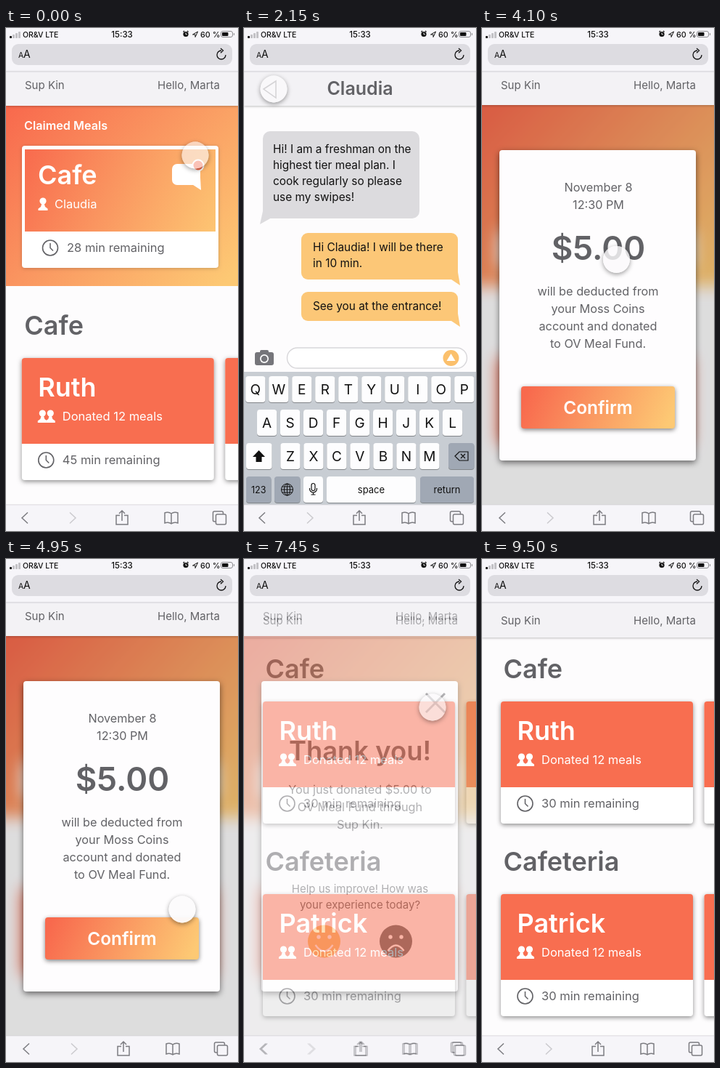
Animation of 320 by 692 pixels, one loop 9.55 s. Source, as an HTML page with a canvas:

```html
<!DOCTYPE html>
<html lang="en">
<head>
<meta charset="utf-8">
<title>Meal sharing prototype</title>
<style>
html, body { margin: 0; width: 100%; height: 100%; overflow: hidden; background: #fff; }
canvas { display: block; width: 320px; height: 692px; }
</style>
</head>
<body>
<canvas id="stage"></canvas>
<script>
const W = 320, H = 692, LOOP = 9550, STEP = 50;
const ratio = window.devicePixelRatio || 1;
const GREY = '#626266', SALMON = '#f86e50', AMBER = '#fcc777', PAPER = '#fdfcfd';
const APP = 'Sup Kin';

function prepare(canvas) {
  canvas.width = W * ratio;
  canvas.height = H * ratio;
  const context = canvas.getContext('2d');
  context.scale(ratio, ratio);
  return context;
}
const stage = prepare(document.getElementById('stage'));
let c = stage;

function screen(draw) {
  const canvas = document.createElement('canvas');
  c = prepare(canvas);
  draw();
  return canvas;
}

function rect(x, y, w, h, fill) {
  c.fillStyle = fill;
  c.fillRect(x, y, w, h);
}
function round(x, y, w, h, r, fill) {
  c.beginPath();
  c.roundRect(x, y, w, h, r);
  c.fillStyle = fill;
  c.fill();
}
function circle(x, y, r, fill) {
  c.beginPath();
  c.arc(x, y, r, 0, Math.PI * 2);
  c.fillStyle = fill;
  c.fill();
}
function shape(points, fill) {
  c.beginPath();
  points.forEach(([x, y]) => c.lineTo(x, y));
  c.closePath();
  c.fillStyle = fill;
  c.fill();
}
function stroke(path, color, width, x = 0, y = 0) {
  c.save();
  c.translate(x, y);
  c.strokeStyle = color;
  c.lineWidth = width;
  c.stroke(new Path2D(path));
  c.restore();
}
function text(s, x, y, size, color = GREY, weight = 400, align = 'left') {
  c.font = `${weight} ${size}px Inter, sans-serif`;
  c.fillStyle = color;
  c.textAlign = align;
  c.fillText(s, x, y);
}
function lines(list, x, y, pitch, size, color, align) {
  list.forEach((s, i) => text(s, x, y + i * pitch, size, color, 400, align));
}
function shadowed(draw, blur = 6, dy = 2, alpha = 0.45) {
  c.save();
  c.shadowColor = `rgba(0,0,0,${alpha})`;
  c.shadowBlur = blur * ratio;
  c.shadowOffsetY = dy * ratio;
  draw();
  c.restore();
}
function sunset(x0, y0, x1, y1) {
  const g = c.createLinearGradient(x0, y0, x1, y1);
  g.addColorStop(0, '#f8694d');
  g.addColorStop(0.45, '#fa9560');
  g.addColorStop(1, '#fdc974');
  return g;
}

function statusBar() {
  rect(0, 0, W, 60, '#f6f5f9');
  for (let i = 0; i < 4; i++) round(5 + i * 4, 11 - i * 2, 3, 3 + i * 2, 0.8, i ? '#c3c2c6' : '#111');
  text('OR&V LTE', 23, 12.5, 10.5, '#111', 500);
  text('15:33', 160, 12.5, 11.5, '#111', 500, 'center');
  circle(248, 8.5, 3.6, '#111');
  stroke('M244.500 5.500l1.500-1.500M251.500 5.500l-1.500-1.500', '#111', 1.3);
  stroke('M248 6.500v2.300h1.800', '#fff', 0.9);
  stroke('M257.500 9l7-4-3.500 7.500v-3.500z', '#111', 1);
  text('60 %', 268, 12.5, 10.8, '#111', 500);
  c.beginPath();
  c.roundRect(296.5, 4.5, 16, 8, 2.5);
  c.strokeStyle = '#8b8b8e';
  c.lineWidth = 1;
  c.stroke();
  round(298, 6, 8.5, 5, 1, '#111');
  rect(314, 7, 1, 3, '#8b8b8e');
  round(8, 22, 304, 29, 9, '#dddce1');
  text('A', 17, 41, 10.5, '#111');
  text('A', 24, 41, 14, '#111');
  stroke('M297 31a6 6 0 1 0 6 6M296 28l3.500 3-3.500 3.200', '#111', 1.3);
}
function header(textY, bottom = 107) {
  shadowed(() => rect(0, 60, W, bottom - 60, '#f3f2f5'), 3, 1, 0.25);
  rect(0, 59.5, W, 1, '#d4d3d7');
  if (!textY) return;
  text(APP, 26, textY, 15);
  text('Hello, Marta', 295, textY, 15, GREY, 400, 'right');
}
function toolbar(shift = 0) {
  rect(0, 656, W, 36, '#f6f5f9');
  rect(0, 655.5, W, 0.8, '#d3d2d6');
  const icon = (d, x, color = '#7c7c81') => stroke(d, color, 1.5, x + shift, 674);
  icon('M4-7.500l-8 7.500 8 7.500', 26);
  icon('M-4-7.500l8 7.500-8 7.500', 92, '#cbcace');
  icon('M-3-3.500h-5v12.500h16v-12.500h-5M0 4v-14M-4-6l4-4 4 4', 160);
  icon('M0-6q-4-3-9-1v14q5-2 9 1 4-3 9-1v-14q-5-2-9 1v14', 228);
  icon('M-5 5h-2q-2 0-2-2v-10q0-2 2-2h10q2 0 2 2v2M-3-5h10q2 0 2 2v10q0 2-2 2h-10q-2 0-2-2v-10q0-2 2-2z', 294.5);
}

function pawn(x, y) {
  circle(x, y - 4, 4.6, '#fff');
  shape([[x - 1.5, y - 1], [x + 1.5, y - 1], [x + 3, y + 4], [x + 6.5, y + 6.5],
    [x + 6.5, y + 9], [x - 6.5, y + 9], [x - 6.5, y + 6.5], [x - 3, y + 4]], '#fff');
}
function clock(x, y) {
  c.beginPath();
  c.arc(x, y, 10.5, 0, Math.PI * 2);
  c.strokeStyle = GREY;
  c.lineWidth = 1.6;
  c.stroke();
  stroke('M0-6.500v6.500l4 4', GREY, 1.5, x, y);
}
function mealCard(x, y, name, minutes) {
  shadowed(() => round(x, y, 265, 168, 4, '#fff'));
  round(x, y, 265, 118, [4, 4, 0, 0], SALMON);
  if (!name) return;
  text(name, x + 22.5, y + 52.5, 36, '#fff', 600);
  pawn(x + 28.5, y + 80);
  pawn(x + 39.5, y + 80);
  text('Donated 12 meals', x + 56, y + 86, 16.5, '#fff');
  clock(x + 33.5, y + 140.5);
  text(`${minutes} min remaining`, x + 56, y + 146, 16.5);
}
function mealRow(x, y, place, name, minutes) {
  text(place, x + 3.5, y - 32, 36, GREY, 600);
  mealCard(x, y, name, minutes);
  mealCard(x + 280.5, y);
}

function home() {
  rect(0, 60, W, H - 60, PAPER);
  rect(0, 107, W, 248, sunset(20, 90, 300, 355));
  text('Claimed Meals', 25, 140, 16.2, '#fff', 600);
  shadowed(() => round(22, 162, 271, 168, 4, '#fff'), 5, 1, 0.2);
  rect(26, 167, 263, 113, sunset(30, 150, 300, 285));
  text('Cafe', 44, 215, 36, '#fff', 600);
  pawn(51, 242);
  text('Claudia', 67, 248, 16.5, '#fff');
  round(229, 187, 39, 29, 7, '#fff');
  shape([[255, 214], [268, 206], [269, 223]], '#fff');
  circle(265, 189, 8.5, '#fff');
  circle(265, 189, 6.5, SALMON);
  clock(61, 302.5);
  text('28 min remaining', 84, 308, 16.5);
  mealRow(21.8, 454, 'Cafe', 'Ruth', 45);
  statusBar();
  header(83.5);
  toolbar();
}
function list() {
  rect(0, 0, W, H, PAPER);
  statusBar();
  header(90, 108);
  mealRow(26, 196, 'Cafe', 'Ruth', 30);
  mealRow(26, 461, 'Cafeteria', 'Patrick', 30);
  toolbar();
}

function key(x, y, w, label, dark, size = 19) {
  shadowed(() => round(x, y, w, 36, 4, dark ? '#a0a8b4' : '#fdfdfe'), 0.5, 1, 0.35);
  if (label) text(label, x + w / 2, y + 18 + size * 0.36, size, '#111', 400, 'center');
}
function keyboard() {
  rect(0, 473, W, 183, '#c8cdd3');
  [['QWERTYUIOP', 2.2], ['ASDFGHJKL', 18], ['ZXCVBNM', 50.3]].forEach(([row, x], r) =>
    [...row].forEach((letter, i) => key(x + i * 32, 479 + r * 46, 27.2, letter)));
  key(3, 571, 35.5);
  shape([[20.5, 581], [29, 590], [24.5, 590], [24.5, 597], [16.5, 597], [16.5, 590], [12, 590]], '#111');
  key(282, 571, 35.5, '', true);
  stroke('M291 589l6-6h12v12h-12zM299 586l6 6M305 586l-6 6', '#111', 1.2);
  key(3, 617, 34.5, '123', true, 12.5);
  key(42, 617, 35.5, '', true);
  stroke('M-8 0a8 8 0 1 0 16 0a8 8 0 1 0-16 0M-4 0a4 8 0 1 0 8 0a4 8 0 1 0-8 0M-8 0h16M0-8v16M-7-4h14M-7 4h14', '#111', 1, 59.5, 635);
  key(82, 617, 27);
  stroke('M-2.500-5a2.500 2.500 0 0 1 5 0v5a2.500 2.500 0 0 1-5 0zM-5-1v1a5 5 0 0 0 10 0v-1M0 5v3M-3 8h6', '#111', 1.2, 95.5, 634);
  key(114, 617, 123, 'space', false, 13);
  key(243, 617, 74, 'return', true, 13);
}
function reply(y, h, words) {
  round(79, y, 216, h, 9, AMBER);
  shape([[283, y + h - 2], [295, y + h - 10], [298, y + h + 8]], AMBER);
  lines(words, 95, y + 24.5, 22, 15.4, '#111');
}
function chat() {
  rect(0, 0, W, H, PAPER);
  statusBar();
  header(0);
  text('Claudia', 160, 91.5, 25, GREY, 600, 'center');
  stroke('M27 84l17-11v23z', '#77777b', 1.5);
  round(26, 142, 216, 120, 10, '#dcdbde');
  shape([[26, 252], [22, 270], [38, 261]], '#dcdbde');
  lines(['Hi! I am a freshman on the', 'highest tier meal plan. I', 'cook regularly so please', 'use my swipes!'],
    40, 171.5, 22, 15.4, '#111');
  reply(282, 64, ['Hi Claudia! I will be there', 'in 10 min.']);
  reply(363, 40, ['See you at the entrance!']);
  round(15, 446, 26, 18, 3, '#75757a');
  round(22, 443, 12, 6, 2, '#75757a');
  circle(28, 455, 6, '#fff');
  circle(28, 455, 4.3, '#75757a');
  c.beginPath();
  c.roundRect(59.5, 440, 248, 28, 14);
  c.fillStyle = '#fff';
  c.fill();
  c.strokeStyle = '#d8d7da';
  c.lineWidth = 1.4;
  c.stroke();
  circle(285.5, 454, 11, '#fbc06c');
  shape([[285.5, 448], [291.5, 458], [279.5, 458]], '#fff');
  keyboard();
  toolbar(-1);
}

// The hero runs past the screen edges so that its blur does not fade there.
const backdrop = screen(() => {
  rect(0, 0, W, H, PAPER);
  c.filter = `blur(${11 * ratio}px)`;
  rect(-60, 20, W + 120, 335, sunset(20, 90, 300, 355));
  rect(22, 280, 271, 50, '#fff');
  rect(22, 454, 265, 118, SALMON);
  c.filter = 'none';
  rect(0, 0, W, H, 'rgba(0,0,0,.125)');
});
function modal() {
  c.drawImage(backdrop, 0, 0, W, H);
  statusBar();
  header(83.5, 106);
  shadowed(() => round(24, 168, 271, 427, 4, '#fefdfe'), 8, 3, 0.55);
  toolbar(2);
}
function confirmation() {
  modal();
  lines(['November 8', '12:30 PM'], 160.5, 225, 24, 16.2, GREY, 'center');
  text('$5.00', 160.5, 319, 45.5, GREY, 600, 'center');
  lines(['will be deducted from', 'your Moss Coins', 'account and donated', 'to OV Meal Fund.'],
    160, 368, 24, 16.3, GREY, 'center');
  shadowed(() => round(54, 493, 212, 58, 4, sunset(70, 480, 250, 560)), 6, 2, 0.5);
  text('Confirm', 160, 530.5, 24.4, '#fff', 600, 'center');
}
function face(x, color, mouth) {
  circle(x, 526, 22.5, color);
  circle(x - 7.5, 520, 2.7, '#fff');
  circle(x + 7.5, 520, 2.7, '#fff');
  stroke(mouth, '#fff', 2.4, x, 526);
}
function thanks() {
  modal();
  stroke('M251 185l26 26M277 185l-26 26', '#66666a', 3);
  text('Thank you!', 160, 277, 36.4, GREY, 600, 'center');
  lines(['You just donated $5.00 to', 'OV Meal Fund through', `${APP}.`], 160, 323, 24, 16.3, GREY, 'center');
  lines(['Help us improve! How was', 'your experience today?'], 160, 458.5, 22.5, 15, GREY, 'center');
  face(110.5, '#fbc06c', 'M-12 5q12 17 24 0');
  face(209.5, GREY, 'M-11 13q11-15 22 0');
}

const homeImage = screen(home);
const scenes = [
  { at: 0, fade: 0, image: homeImage },
  { at: 450, fade: 400, image: screen(chat) },
  { at: 2350, fade: 400, image: homeImage },
  { at: 3700, fade: 400, image: screen(confirmation) },
  { at: 6200, fade: 400, image: screen(thanks) },
  { at: 7250, fade: 400, image: screen(list) }
];
c = stage;

// time, x, y, opacity
const pointer = [
  [0, 261, 175, 0.6], [450, 261, 175, 0.6], [900, 261, 175, 0.85],
  [1850, 41, 84, 0.85], [2100, 41, 84, 0.7], [2400, 41, 84, 0.7],
  [3100, 177, 297, 0.75], [3800, 177, 297, 0.65], [4300, 190, 330, 0.9],
  [4950, 243, 482, 0.95], [5500, 236, 515, 0.9], [5900, 236, 515, 0.6],
  [6400, 236, 515, 0.6], [7100, 260, 204, 0.85], [7300, 260, 204, 0.6],
  [7475, 260, 204, 0.6], [7700, 260, 204, 0]
];
function drawPointer(t) {
  const next = pointer.findIndex(k => k[0] > t);
  if (next < 0) return;
  const a = pointer[next - 1], b = pointer[next];
  const p = (t - a[0]) / (b[0] - a[0]);
  const ease = p * p * (3 - 2 * p);
  const [x, y, alpha] = [1, 2, 3].map(i => a[i] + (b[i] - a[i]) * ease);
  c.save();
  // The shadow falls only outside the translucent disc.
  c.beginPath();
  c.rect(0, 0, W, H);
  c.arc(x, y, 18.5, 0, Math.PI * 2);
  c.clip('evenodd');
  c.globalAlpha = Math.min(1, alpha * 1.5);
  shadowed(() => circle(x, y, 18.5, '#fff'), 6, 2, 0.4);
  c.restore();
  c.save();
  c.globalAlpha = alpha;
  circle(x, y, 18.5, '#fcfbfc');
  c.restore();
}

function frame() {
  const t = Math.floor(performance.now() % LOOP / STEP) * STEP;
  for (const { at, fade, image } of scenes) {
    if (t < at) break;
    c.globalAlpha = fade ? Math.min(1, (t - at) / fade) : 1;
    c.drawImage(image, 0, 0, W, H);
  }
  c.globalAlpha = 1;
  drawPointer(t);
  requestAnimationFrame(frame);
}
frame();
</script>
</body>
</html>
```
